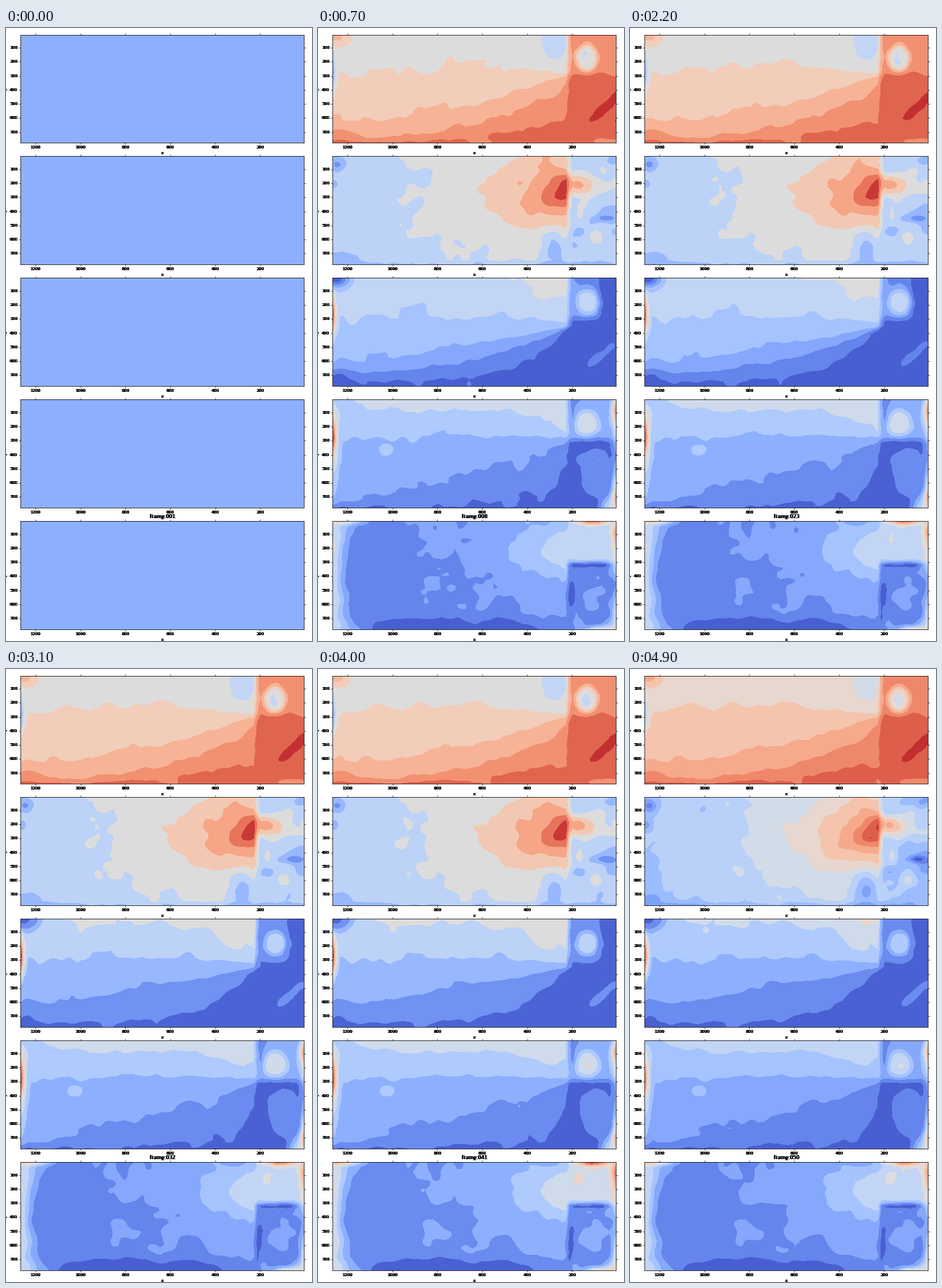
These frames come from a looping animation (529 px wide and 1058 px high, 5 s). A matplotlib script:

```python
import numpy as np
import matplotlib.pyplot as plt
from matplotlib.animation import FuncAnimation

W, H, DPI = 529, 1058, 100
FRAMES, INTERVAL = 50, 100
LEFT, RIGHT, PANEL_H = 25, 515, 186.5
TOP, PITCH = 11.5, 209.93

cmap = plt.get_cmap("coolwarm")
rng = np.random.default_rng(5)

# Grid in panel pixels: x runs over the stage, y starts at the panel's top.
gx = np.linspace(LEFT, RIGHT, 80)
gy = np.linspace(0, PANEL_H, 49)
X, Y = np.meshgrid(gx, gy)


def step(a, at, soft):
    return np.clip((a - at) / soft + 0.5, 0, 1)


def bump(amp, cx, cy, rx, ry, p=2, lean=0):
    dx, dy = X - cx, Y - cy
    r = np.hypot(dx / rx, (dy + lean * dx) / ry)
    return amp * np.exp(-r ** p)


def curve(y0, y1, p=1, dip=0):
    t = np.clip((gx - LEFT) / 408, 0, 1)
    return y0 + (y1 - y0) * t ** p - dip * np.sin(np.pi * t)


def layers(values, *curves):
    """Field that takes each value along its curve, linear between them."""
    lines = np.maximum.accumulate(np.array(curves), axis=0)
    lines += 0.01 * np.arange(len(values))[:, None]
    return np.array([np.interp(gy, col, values) for col in lines.T]).T


SIDE = step(X, 433, 9)


def with_side(z, top, bottom):
    """Replace the right strip by an upper and a lower level."""
    side = top + (bottom - top) * step(Y, 69, 14)
    return z + (side - z) * SIDE


def ring(amp):
    return bump(amp, 465, 41, 20, 23, 4)


def scar(amp):
    return bump(amp, 494, 128, 30, 13, 4, lean=0.8)


def corner(amp):
    return bump(amp, 30, 0, 27, 17)


def left_spot(amp):
    return bump(amp, 24, 66, 6, 32)


def right_edge(amp):
    return (bump(amp, 517, 18, 9, 24) + bump(amp, 518, 158, 9, 26)
            + bump(0.8 * amp, 522, 192, 34, 34, 4) + bump(0.4 * amp, 518, 90, 9, 90, 4))


def field_a():
    z = layers([5.15, 6, 7, 8, 9, 9.4], curve(0, 0), curve(68, 68, dip=13),
               curve(149, 70, 1.7), curve(181, 85, 2.7), curve(185, 140, 4),
               curve(210, 200))
    z = with_side(z, 8.6, 9.5)
    return (z + ring(-3.8) + scar(1.1) + corner(2.5) + left_spot(-4.2)
            + bump(-1.1, 408, 10, 22, 36, 4) + bump(0.8, 36, 176, 22, 14)
            + bump(-0.9, 485, 184, 40, 9))


def field_b():
    dx, dy = X - 418, Y - 70
    r = np.hypot(dx, dy * np.where(dy > 0, 2.1, 1.4))
    z = np.interp(r, [0, 8, 32, 70, 133, 245, 420], [8.6, 8, 7, 6, 5, 4, 3.35])
    z = with_side(z + bump(-2, 408, 158, 24, 36), 3.9, 3.25)
    return (z + bump(2.3, 446, 46, 28, 16) + bump(-1.2, 508, 8, 20, 14)
            + bump(1.3, 453, 100, 8, 15) + bump(1.3, 480, 140, 13, 16)
            + bump(-1.8, 494, 107, 20, 7) + bump(-1.7, 34, 14, 14, 13)
            + bump(-1.5, 27, 48, 9, 9) + bump(-1, 36, 176, 28, 14)
            - 0.8 * step(Y, 183, 8))


def field_c():
    z = layers([4.85, 4.75, 4, 3, 2, 1, 0.4], curve(0, 0), curve(9, 9),
               curve(67, 74, dip=7), curve(152, 83, 1.1), curve(165, 84, 2.2),
               curve(179, 77, 5), curve(200, 140, 5))
    z = with_side(z + bump(0.6, 415, 22, 55, 45, 4), 2.2, 0.5)
    z -= 1.7 * step(X, 486, 14) * step(-Y, -69, 14)
    return (z + ring(2.7) + scar(0.8) + corner(-4.6) + left_spot(6)
            + bump(-1, 36, 166, 20, 14))


def field_d():
    z = layers([4.35, 4, 3, 2, 1, 0.5], curve(0, 0), curve(16, 58, 7),
               curve(75, 66, dip=8), curve(177, 72, 1.4), curve(184, 74, 20),
               curve(196, 150, 20))
    z = with_side(z, 2.4, 0.5)
    return (z + ring(2.3) + bump(1, 482, 126, 30, 44, 6) + right_edge(4.5)
            + bump(-1, 438, 24, 6, 26) + corner(-0.8) + left_spot(5)
            + bump(1.5, 24, 95, 12, 90, 4) + bump(0.6, 118, 88, 12, 9))


def field_e():
    s = Y / PANEL_H
    diag = 188 + 240 * s ** 1.8
    z = 1.55 + 0.45 * np.clip((X - 110) / (diag - 110), 0, 1.9)
    wide = (15 + 20 * (2 * s - 1) ** 2) * (1 + 0.15 * np.sin(20 * s))
    z += 3.2 * np.exp(-((X - LEFT) / wide) ** 2)
    z += bump(2.5, 436, 50, 80, 45) + bump(-1.3, 240, 192, 180, 30, 4)
    z = with_side(z, 4.3, 1.5)
    return (z + bump(1.4, 450, 28, 10, 14) + bump(1.3, 474, 124, 22, 30)
            + bump(-1.4, 469, 75, 38, 6, 6) + bump(-1.2, 435, 130, 7, 58, 6)
            + right_edge(3) + bump(4.5, 475, 0, 25, 5)
            + bump(5, 485, 190, 22, 8) + bump(3, 50, 0, 32, 5))


def smooth(passes):
    a = rng.normal(size=X.shape)
    for k in range(2 * passes):
        a = np.pad(a, 1, mode="edge")
        a = (a[:-2] + 2 * a[1:-1] + a[2:]) / 4
        sides = a[:, :-2] + 2 * a[:, 1:-1] + a[:, 2:]
        a = sides / 4 if k % 2 else a[:, 1:-1]
    return a / a.std()


def rough():
    return 0.6 * smooth(2) + 0.8 * smooth(9)


class Panel:
    """Base field, noise that averages out over time, and colour steps."""

    def __init__(self, field, amp, *steps):
        self.base, self.steps = field(), steps
        self.amp = amp * (1 + SIDE)
        self.slow = rough(), rough()
        self.jitter = np.cumsum([smooth(2) for _ in range(FRAMES)], axis=0)

    def values(self, i):
        a, b = self.slow
        turn = 1.1 * i / FRAMES
        noise = a * np.cos(turn) + b * np.sin(turn)
        return self.base + self.amp * (noise + 1.6 * self.jitter[i] / (i + 1))

    def edges(self, i):
        return [e for start, e in self.steps if start <= i][-1]


LATE = 45
whole = np.arange
panels = [
    Panel(field_a, 0.09, (0, whole(12)), (LATE, whole(-1, 12))),
    Panel(field_b, 0.13, (0, whole(10)), (LATE, np.linspace(0.6, 9.2, 13))),
    Panel(field_c, 0.08, (0, whole(12)),
          (27, np.array([0, 1, 3, 4, 4.75, 6, 7, 8, 9, 11])),
          (LATE, np.array([0, 1, 3, 4, 4.75, 5.5, 6.5, 7.5, 8.5, 9.5, 11]))),
    Panel(field_d, 0.08, (0, whole(11)), (LATE, whole(12))),
    Panel(field_e, 0.15, (0, whole(12)), (36, whole(11)), (LATE, whole(12))),
]

fig = plt.figure(figsize=(W / DPI, H / DPI), dpi=DPI, facecolor="white")


def label(x, y, s, px=7.06, **kw):
    """Text at stage pixels, doubled one pixel apart to give the heavy look."""
    kw = {"ha": "center", "va": "center", **kw}
    return [fig.text((x + d) / W, 1 - y / H, s, fontsize=px * 72 / DPI,
                     family="DejaVu Sans", **kw)
            for d in (-0.5, 0.5) for _ in range(2)]


def make_axes(top):
    ax = fig.add_axes([LEFT / W, 1 - (top + PANEL_H) / H,
                       (RIGHT - LEFT) / W, PANEL_H / H])
    ax.set(xlim=(LEFT, RIGHT), ylim=(PANEL_H, 0), facecolor=cmap(0.25))
    xt = {v: RIGHT - (v - 5.7) * 0.3886 for v in range(200, 1201, 200)}
    yt = {v: (v - 7.2) * 0.2425 for v in range(100, 701, 100)}
    ax.set_xticks(list(xt.values()))
    ax.set_yticks(list(yt.values()))
    ax.tick_params(length=2, width=0.5, top=True, right=True,
                   labelbottom=False, labelleft=False)
    for spine in ax.spines.values():
        spine.set_linewidth(0.6)
    for v, x in xt.items():
        label(x, top + PANEL_H + 8, str(v))
    for v, y in yt.items():
        label(20, top + y, str(v), ha="right")
    label(270, top + PANEL_H + 18.5, "x")
    label(-1, top + PANEL_H / 2, "y", rotation=90)
    return ax


axes = [make_axes(TOP + PITCH * k) for k in range(len(panels))]
title = label(270, 843.5, "", px=8.47)
drawn = []


def update(i):
    while drawn:
        drawn.pop().remove()
    for t in title:
        t.set_text(f"Frame:{i + 1:03d}")
    if i == 0:
        return title
    for ax, panel in zip(axes, panels):
        e = panel.edges(i)
        n = len(e) - 1
        z = np.clip(panel.values(i), e[0] + 0.05, e[-1] - 0.05)
        colors = [cmap((k + 0.5) / n) for k in range(n)]
        drawn.append(ax.contourf(gx, gy, z, levels=e, colors=colors))
    return title


anim = FuncAnimation(fig, update, frames=FRAMES, interval=INTERVAL,
                     init_func=lambda: update(0), repeat=True, repeat_delay=0)
plt.show()
```
